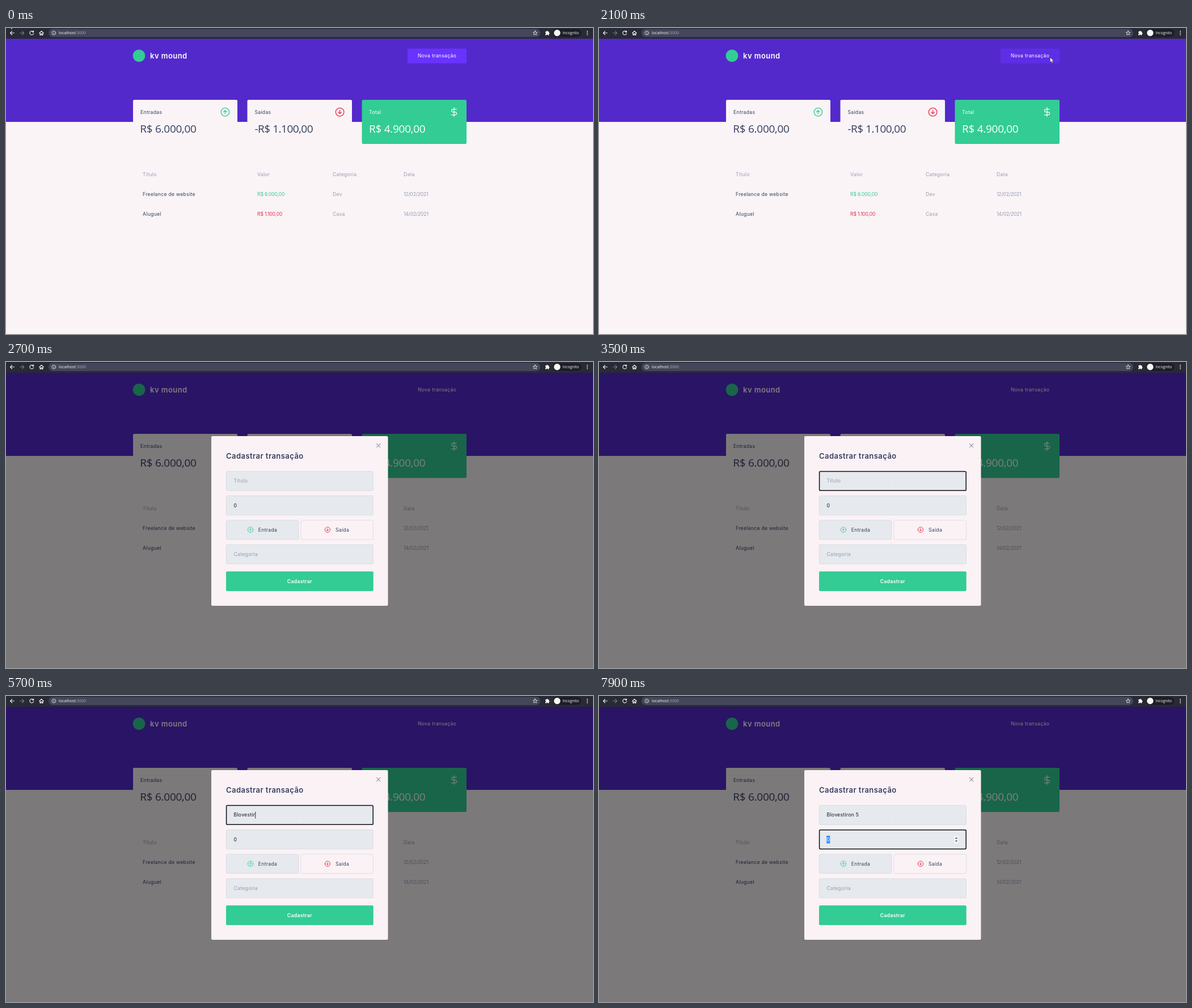
An HTML page for the animation above (8000 ms loop, 1035 by 541 pixels).

```html
<!DOCTYPE html>
<html lang="pt-BR">
<head>
<meta charset="utf-8">
<title>Transações</title>
<style>
  html, body { margin: 0; width: 100%; height: 100%; overflow: hidden; background: #faf4f7; }
  svg { display: block; width: 1035px; height: 541px; }
  text { font: 400 8.65px Inter, sans-serif; letter-spacing: .035em; fill: #969cb2; white-space: pre; }
  .dark { fill: #363f5f; }
  .white { fill: #fff; }
  .green { fill: #33cc95; }
  .red { fill: #e52e4d; }
  .mid { text-anchor: middle; }
  .num { letter-spacing: -.02em; }
  .value { font: 500 19px "Open Sans", sans-serif; letter-spacing: -.015em; }
  .head { font-weight: 600; font-size: 13px; }
  .bold { font-weight: 600; }
  .bar { font: 400 7.1px "Open Sans", sans-serif; letter-spacing: 0; fill: #f8f8f2; }
  .ink { fill: #14151a; }
  .line { fill: none; stroke-linecap: round; stroke-linejoin: round; }
  .field { fill: #e6e9ed; stroke: #d3d6dc; stroke-width: .7; }
</style>
</head>
<body>
<svg viewBox="0 0 1035 541" xmlns="http://www.w3.org/2000/svg">
  <defs>
    <g id="arrow" class="line">
      <circle r="7.3"/>
      <path d="M0 3.2V-3M-3 0L0-3 3 0"/>
    </g>
    <path id="dollar" class="line" d="M0-8V8M4.3-5H-2a2.5 2.5 0 0 0 0 5H2a2.5 2.5 0 0 1 0 5H-4.6"/>
  </defs>

  <!-- page -->
  <rect width="1035" height="541" fill="#faf4f7"/>
  <rect y="19" width="1035" height="147" fill="#5429cc"/>
  <circle cx="234.5" cy="49" r="10.8" fill="#33cc95"/>
  <text class="head white" x="254" y="53.6">kv mound</text>
  <rect id="button" x="708" y="36.5" width="104" height="26" rx="2"/>
  <text class="white mid" x="760" y="52.3">Nova transação</text>

  <g fill="#faf4f7">
    <rect x="224" y="127" width="184" height="78" rx="2.2"/>
    <rect x="425.5" y="127" width="184.5" height="78" rx="2.2"/>
    <rect x="627.5" y="127" width="184.5" height="78" rx="2.2" fill="#33cc95"/>
  </g>
  <text class="dark" x="237" y="151.8">Entradas</text>
  <text class="dark" x="438.5" y="151.8">Saídas</text>
  <text class="white" x="640" y="151.8">Total</text>
  <text class="value dark" x="236.3" y="185.2">R$ 6.000,00</text>
  <text class="value dark" x="438.5" y="185.2" style="letter-spacing:-.5px">-R$ 1.100,00</text>
  <text class="value white" x="640" y="185.2">R$ 4.900,00</text>
  <use href="#arrow" transform="translate(386.4 148.6)" stroke="#33cc95" stroke-width="1.3"/>
  <use href="#arrow" transform="translate(588.6 148.6) rotate(180)" stroke="#e52e4d" stroke-width="1.3"/>
  <use href="#dollar" transform="translate(790 148.6)" stroke="#fff" stroke-width="1.2"/>
  <g id="table"></g>

  <!-- dialog -->
  <g id="dialog">
    <rect y="19" width="1035" height="522" opacity=".5"/>
    <rect x="362" y="131" width="311.5" height="300" rx="2.2" fill="#faf2f5"/>
    <path class="line" d="M653.5 144.5l6.4 6.4m0-6.4l-6.4 6.4" stroke="#9a9ba3" stroke-width="1.1"/>
    <text class="head dark" x="388" y="171">Cadastrar transação</text>
    <g class="field">
      <rect x="388.4" y="193.4" width="259" height="34" rx="2"/>
      <rect x="388.4" y="236.6" width="259" height="34" rx="2"/>
      <rect x="388.4" y="279.8" width="127.4" height="34" rx="2"/>
      <rect x="520" y="279.8" width="127.4" height="34" rx="2" fill="#faf2f5"/>
      <rect x="388.4" y="323" width="259" height="34" rx="2"/>
    </g>
    <rect x="388" y="370.3" width="259.7" height="34.6" rx="2" fill="#33cc95"/>
    <text class="white bold mid" x="517.8" y="390.8">Cadastrar</text>
    <use href="#arrow" transform="translate(431 296.6) scale(.64)" stroke="#33cc95" stroke-width="1.5"/>
    <use href="#arrow" transform="translate(567 296.6) rotate(180) scale(.64)" stroke="#e52e4d" stroke-width="1.5"/>
    <text class="dark" x="444.8" y="299.8">Entrada</text>
    <text class="dark" x="581" y="299.8">Saída</text>
    <text x="401.5" y="343.2">Categoria</text>

    <rect id="focus" x="388.6" width="258.6" height="33.6" rx="1.8" fill="none" stroke="#101014" stroke-width="1.5"/>
    <text id="title" x="401.5" y="213.4"></text>
    <rect id="caret" y="204.5" width=".8" height="12"/>
    <rect id="select" x="401.3" y="247" width="6" height="13.6" fill="#338fff"/>
    <text id="amount" x="401.5" y="256.8">0</text>
    <g id="spinner">
      <rect x="626" y="247" width="8" height="13.5" fill="#f3f3f3"/>
      <path d="M627.9 252.2l2.1-2.4 2.1 2.4zM627.9 255.6l2.1 2.4 2.1-2.4z" fill="#404048"/>
    </g>
    <path id="beam" class="line" d="M516 214.6h2M517 214.6v8.4M516 223h2" stroke="#f4f6f8" stroke-width=".6"/>
  </g>

  <!-- browser bar -->
  <rect width="1035" height="19" fill="#282a36"/>
  <rect x="75" y="1.5" width="867" height="14.6" rx="7.3" fill="#44475a"/>
  <g class="line" stroke="#f8f8f2" stroke-width="1.1">
    <path d="M14.5 8.8h-7m3.2-3.2L7.5 8.8l3.2 3.2"/>
    <path d="M24.7 8.8h7m-3.2-3.2l3.2 3.2-3.2 3.2" stroke="#7b7d88"/>
    <path d="M48 6.6a3.4 3.4 0 1 0 .7 3M48.6 5v2.2h-2.3"/>
    <path d="M58.8 9l3.7-3.6L66.2 9M60 8.4v4h1.6V10h1.8v2.4H65v-4"/>
    <g stroke-width=".8">
      <circle cx="84.3" cy="8.8" r="3.4"/>
      <path d="M84.3 8.5v2M84.3 7v.1"/>
      <path d="M933 5l1.1 2.5 2.7.2-2.1 1.8.7 2.7-2.4-1.4-2.4 1.4.7-2.7-2.1-1.8 2.7-.2z"/>
    </g>
  </g>
  <path d="M951 6.3h2a1.2 1.2 0 0 1 2.4 0h1.8v2a1.2 1.2 0 0 1 0 2.4v2h-2a1.1 1.1 0 0 0-2.2 0h-2v-2a1.1 1.1 0 0 0 0-2.2z" fill="#f8f8f2"/>
  <rect x="964.5" y="1.8" width="50" height="14" rx="7" fill="#1c1d26"/>
  <circle cx="971.8" cy="8.8" r="5.7" fill="#f8f8f2"/>
  <g fill="#f8f8f2">
    <circle cx="1025" cy="6" r=".9"/>
    <circle cx="1025" cy="8.9" r=".9"/>
    <circle cx="1025" cy="11.8" r=".9"/>
  </g>
  <text class="bar" x="93" y="11.3">localhost<tspan fill="#a9abb5">:3000</tspan></text>
  <text class="bar" x="981.3" y="11.2" style="font-size:6.7px">Incognito</text>

  <path id="pointer" d="M0 0v8.6l2-1.8 1.4 3.1 1.4-.6-1.4-3h2.7z" fill="#fff" stroke="#15151c" stroke-width=".4"/>
</svg>
<script>
const LOOP = 8000;
const WORD = 'Blovestiron 5';
const $ = id => document.getElementById(id);

const rows = [
  ['Título', 'Valor', 'Categoria', 'Data'],
  ['Freelance de website', 'R$ 6.000,00', 'Dev', '12/02/2021'],
  ['Aluguel', 'R$ 1.100,00', 'Casa', '14/02/2021']
];
const styles = [
  ['', '', '', ''],
  ['dark', 'green num', '', 'num'],
  ['dark', 'red num', '', 'num']
];
$('table').innerHTML = rows.map((row, r) => row.map((cell, c) =>
  `<text class="${styles[r][c]}" x="${[241, 443, 576, 701][c]}" y="${261.7 + r * 35.1}">${cell}</text>`
).join('')).join('');

// Each step: start time in ms, then the values held until the next one.
const pointerSteps = [
  [0, 6.5, -7.5],
  [200, 40, 22], [300, 125, 72], [400, 194, 112], [500, 211, 117],
  [800, 201, 115], [900, 188, 102], [1000, 270, 74], [1100, 425, 50], [1200, 570, 42], [1300, 616, 49],
  [1500, 650, 56], [1600, 745, 70], [1700, 828, 76], [1800, 806, 60], [1900, 795.5, 52],
  [2300, 794, 66], [2400, 785.5, 105], [2600, 722, 189], [2700, -50, -50]
];
const buttonSteps = [[0, '#6933ff'], [1800, '#6431f3'], [1900, '#5e2ee6'], [2400, '#5429cc']];
const typeSteps = [
  [0, 0], [4400, 1], [4600, 2], [4800, 3], [5000, 4], [5100, 5], [5400, 7],
  [5600, 8], [5700, 9], [6600, 10], [6700, 11], [7400, 12], [7600, 13]
];
const caretSteps = [
  [0, false], [3000, true], [3500, false], [4000, true], [6200, false],
  [6600, true], [7200, false], [7400, true], [7900, false]
];

const at = (steps, t) => steps.findLast(s => s[0] <= t).slice(1);
const show = (id, on) => $(id).setAttribute('visibility', on ? 'inherit' : 'hidden');

function draw(t) {
  const [x, y] = at(pointerSteps, t);
  $('pointer').setAttribute('transform', `translate(${x} ${y})`);
  $('button').setAttribute('fill', at(buttonSteps, t)[0]);
  show('dialog', t >= 2200);

  const count = at(typeSteps, t)[0];
  const title = $('title');
  title.textContent = count ? WORD.slice(0, count) : 'Título';
  title.setAttribute('class', count ? 'ink' : '');
  $('caret').setAttribute('x', 401.5 + (count ? title.getComputedTextLength() : 0));
  show('caret', at(caretSteps, t)[0]);

  const onAmount = t >= 7900;
  show('focus', t >= 3000);
  $('focus').setAttribute('y', onAmount ? 236.8 : 193.6);
  show('select', onAmount);
  show('spinner', onAmount);
  $('amount').setAttribute('class', onAmount ? 'white' : 'ink');
  show('beam', t >= 2900);
}

const start = performance.now();
function tick() {
  draw((performance.now() - start) % LOOP);
  requestAnimationFrame(tick);
}
tick();
</script>
</body>
</html>
```
